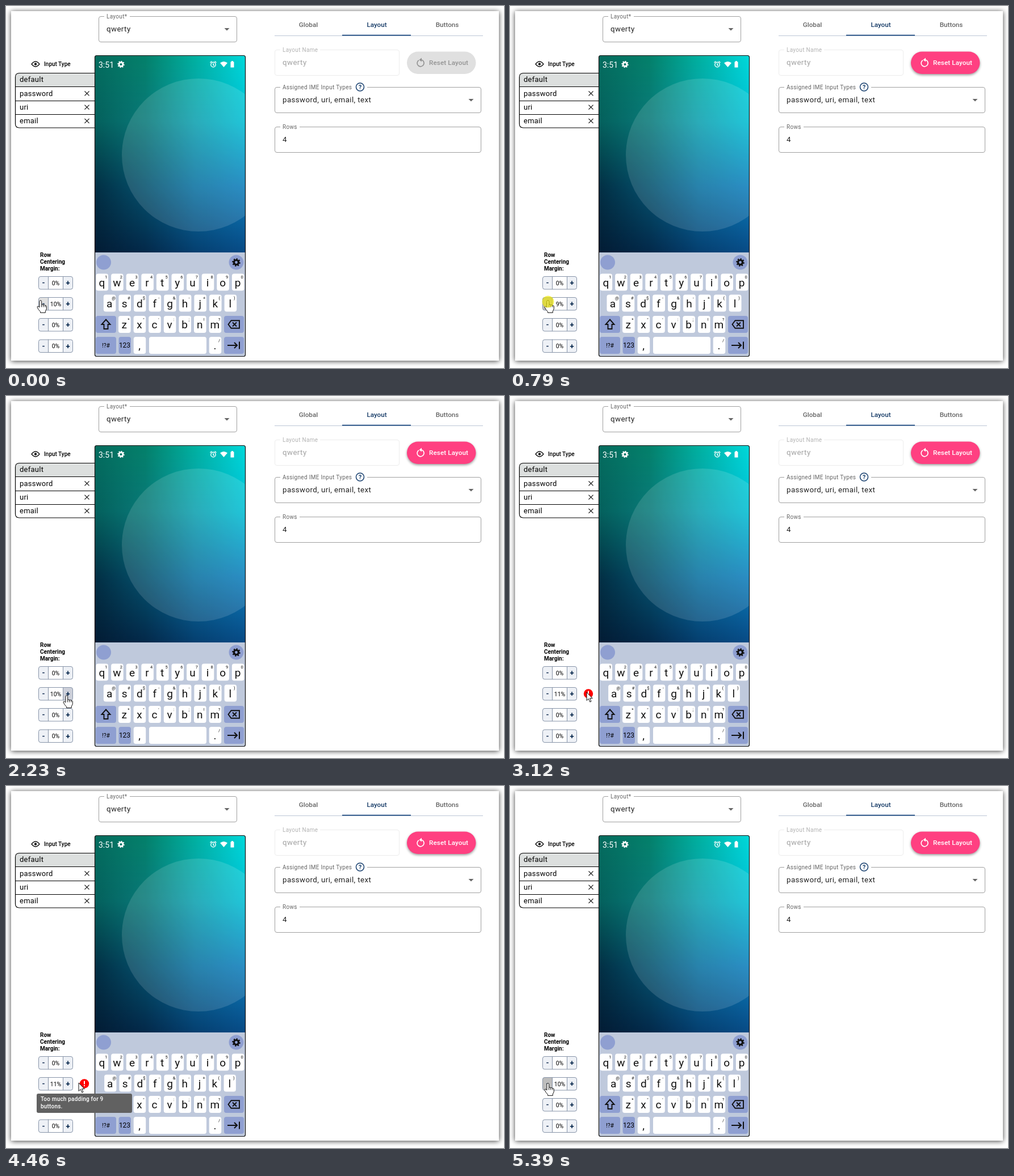
Animation of 877 by 639 pixels, one loop 5460 ms. Source, as an HTML page with a canvas:

```html
<!DOCTYPE html>
<html lang="en">
<head>
<meta charset="utf-8">
<title>Row centering margin</title>
<style>
  html, body { margin: 0; width: 100%; height: 100%; overflow: hidden; background: #fff; }
  #card { position: absolute; left: 9px; top: 9px; width: 859px; height: 617px; background: #fff; box-shadow: 0 1px 9px rgba(0,0,0,.75); }
  #wall { position: absolute; left: 157px; top: 88px; }
  svg { position: absolute; left: 0; top: 0; font-family: Roboto, sans-serif; }
  .body { font-size: 13.3px; letter-spacing: .42px; fill: #222; }
  .label { font-size: 10px; letter-spacing: .31px; fill: #666; }
  .item { font-size: 13px; letter-spacing: .25px; }
  .tab { font-size: 11.7px; font-weight: 500; fill: #666; text-anchor: middle; }
  .small { font-size: 10px; font-weight: 700; }
  .key { font-size: 19px; fill: #111; text-anchor: middle; }
  .sup { font-size: 7.5px; fill: #111; text-anchor: middle; }
  .mid { font-size: 10.5px; text-anchor: middle; }
  .sign { font-size: 13px; font-weight: 700; fill: #0a2a4f; text-anchor: middle; }
  .tip { font-size: 10px; font-weight: 500; letter-spacing: .2px; fill: #fff; }
</style>
</head>
<body>
<div id="card"></div>
<canvas id="wall" width="264" height="347"></canvas>
<svg id="stage" width="877" height="639"></svg>
<script>
const LOOP = 5460;
const BLUE = '#8f9fd1';

// Each list holds [start time, value]; the last one reached applies.
const margins = [[0, 10], [540, 9], [930, 8], [1690, 9], [1970, 10], [2440, 11], [5200, 10]];
const clicks = [[470, 610], [780, 930], [1620, 1760], [1900, 2030], [2370, 2510], [5130, 5270]];
const path = [
  [0, 61, 520], [59, 61, 520], [60, 59, 520], [260, 59, 520], [470, 67, 520], [930, 67, 520],
  [1350, 106, 528], [1420, 107, 529], [2710, 107, 529], [3120, 135, 523],
  [4459, 135, 523], [4460, 128, 524], [4530, 126, 524], [4990, 67, 525], [LOOP, 67, 525]
];

const at = (list, t) => list.filter(([start]) => start <= t).pop()[1];
const mix = (a, b, k) => a + (b - a) * k;

function along(points, t) {
  const i = Math.max(1, points.findIndex(p => p[0] >= t));
  const [t0, x0, y0] = points[i - 1], [t1, x1, y1] = points[i];
  const k = (t - t0) / (t1 - t0);
  return [mix(x0, x1, k), mix(y0, y1, k)];
}

const text = (x, y, cls, s, extra = '') =>
  `<text x="${x}" y="${y}" class="${cls}" ${extra}>${s.replace(/&/g, '&amp;')}</text>`;
const rect = (x, y, w, h, r, fill, extra = '') =>
  `<rect x="${x}" y="${y}" width="${w}" height="${h}" rx="${r}" fill="${fill}" ${extra}/>`;
const line = (d, color, width = 1, extra = '') =>
  `<path d="${d}" fill="none" stroke="${color}" stroke-width="${width}" ${extra}/>`;
const disc = (x, y, r, fill, extra = '') =>
  `<circle cx="${x}" cy="${y}" r="${r}" fill="${fill}" ${extra}/>`;
const caret = (x, y) => `<path d="M${x - 4.5} ${y - 2}h9l-4.5 4.5z" fill="#666"/>`;

function gear(x, y, size, color) {
  return `<g transform="translate(${x} ${y}) scale(${size / 14})" fill="none" stroke="${color}">
    <circle r="4" stroke-width="3.2"/><circle r="6" stroke-width="2.6" pathLength="16" stroke-dasharray="1 1"/></g>`;
}

function field(x, y, w, label, notch, value, off = false) {
  return rect(x + .5, y + .5, w - 1, 45, 3.5, 'none', `stroke="${off ? '#ececec' : '#a0a0a0'}"`) +
    rect(x + 10, y - 1, notch, 4, 0, '#fff') +
    text(x + 14, y + 3.5, 'label', label, off ? 'style="fill:#b4b4b4"' : '') +
    text(x + 14, y + 27, 'body', value, off ? 'style="fill:#a2a2a2"' : '');
}

function resetButton(on) {
  const ink = on ? '#fff' : '#939393';
  const shadow = on ? 'style="filter:drop-shadow(0 2px 2px rgba(0,0,0,.4))"' : '';
  return rect(706, 80.5, 121.5, 39.5, 19.7, on ? '#ff4081' : '#e0e0e0', shadow) +
    line('M727 95.7A6 6 0 1 0 731.5 95', ink, 1.7) +
    `<path d="M732 91.5v7l-4.5-3.5z" fill="${ink}"/>` +
    text(745, 104.3, 'tab', 'Reset Layout', `style="fill:${ink};text-anchor:start;letter-spacing:.1px"`);
}

function letterKey(cx, top, w, ch, sup = '') {
  return rect(cx - w / 2, top, w, 30, 4, '#fff') + text(cx - .5, top + 22, 'key', ch) +
    text(cx + 7, top + 8.5, 'sup', sup);
}

function letterRow(left, pitch, top, letters, sups) {
  return [...letters].map((ch, i) =>
    letterKey(left + pitch * (i + .5), top, pitch - 5, ch, sups[i])).join('');
}

// The margin shrinks the nine keys and centres them.
const centeredRow = m =>
  letterRow(156 + 266 * m / 200, 266 * (1 - m / 100) / 9, 509.5, 'asdfghjkl', '@#$-&-+()');

function stepper(y, value, minus = '#eef1f6', plus = '#eef1f6') {
  return rect(57.5, y + .5, 60, 22.5, 3.5, '#fff') +
    `<path d="M74.5 ${y + .5}h-14q-3 0-3 3v16.5q0 3 3 3h14z" fill="${minus}"/>` +
    `<path d="M100.5 ${y + .5}h14q3 0 3 3v16.5q0 3-3 3h-14z" fill="${plus}"/>` +
    rect(57.5, y + .5, 60, 22.5, 3.5, 'none', 'stroke="#8794a8"') +
    line(`M74.5 ${y}v23M100.5 ${y}v23`, '#8794a8') +
    text(66, y + 16, 'sign', '-') + text(109, y + 16, 'sign', '+') +
    text(87.5, y + 15.5, 'mid', value + '%');
}

function inputTypes() {
  const names = ['default', 'password', 'uri', 'email'];
  const shape = 'M156 118.5H23.5q-7 0-7 7v82.5q0 7 7 7H156';
  return line('M45 102.5q7-9 14 0q-7 9-14 0z', '#111', 1.3) + disc(52, 102.5, 2.2, '#111') +
    text(67, 106, 'small', 'Input Type', 'style="font-weight:500"') +
    `<path d="M156 118.5H23.5q-7 0-7 7V142H156z" fill="#dcdfde"/>` + line(shape, '#000', 1.2) +
    names.map((name, i) => {
      const y = 118 + 24.3 * i;
      const extras = i ? line(`M16.5 ${Math.round(y) + .5}H156`, '#000') +
        line(`M138.5 ${y + 8}l8 8m0-8l-8 8`, '#111', 1.2) : '';
      return text(24, y + 16.3, 'item', name) + extras;
    }).join('');
}

function phone() {
  return `<clipPath id="screen"><rect x="157" y="88" width="264" height="347"/></clipPath>` +
    disc(339, 263, 135, '#fff', 'opacity=".13" clip-path="url(#screen)"') +
    text(163, 109, '', '3:51', 'fill="#fff" font-size="14"') + gear(202.5, 103, 12, '#fff') +
    `<g stroke="#fff" fill="none" stroke-width="1.4"><circle cx="365" cy="103.5" r="4.2"/>
     <path d="M365 101v3l2 1M359.5 100l3-2.5M370.5 100l-3-2.5"/></g>
     <path d="M377 100.5q6.5-5 13 0l-6.5 7.5zM395.5 98.5h1.5v-1.5h3v1.5h1.5v10h-6z" fill="#fff"/>` +
    rect(157, 435, 264, 183, 0, '#bfc9dc') +
    disc(172, 452.5, 13, BLUE) + disc(405.5, 452.5, 13, BLUE) + gear(405.5, 452.5, 14, '#111') +
    letterRow(156, 26.6, 472.5, 'qwertyuiop', '1234567890') +
    letterRow(195.5, 26.6, 547, 'zxcvbnm', `*"':;!?`) +
    [[158, 547, 36], [384, 547, 35], [158, 584, 36], [198.5, 584, 21.5], [384, 584, 35]]
      .map(([x, y, w]) => rect(x, y, w, 30, 4, BLUE)).join('') +
    line('M176 553.5l7.5 8.5h-4v8h-7v-8h-4z', '#111', 1.9) +
    line('M391.5 562l5-6.8h14.5v13.6h-14.5zM399 558.5l7 7m0-7l-7 7', '#111', 1.9) +
    line('M390 599h17m-5-5l5 5l-5 5M411 592.5v13', '#111', 2) +
    text(176, 602.5, 'mid', '!?#') + text(209, 603, 'mid', '123', 'style="font-size:12px"') +
    letterKey(235.5, 584, 21.5, ',') + rect(252, 584, 101, 30, 4, '#fff') +
    letterKey(368.5, 584, 21.5, '.', '/') +
    '<g id="row"></g>' + rect(156.5, 87.5, 265, 531, 3, 'none', 'stroke="#111" stroke-width="1.2"');
}

function settings() {
  return text(532.5, 36.5, 'tab', 'Global') +
    text(653, 36.5, 'tab', 'Layout', 'style="fill:#153a66"') + text(777, 36.5, 'tab', 'Buttons') +
    line('M473 52.5h367', '#bcc6d6') + line('M592 51.7h121', '#1d4a80', 1.7) +
    field(163, 18, 244, 'Layout*', 45, 'qwerty') + caret(389, 41) +
    field(473, 77, 220, 'Layout Name', 70, 'qwerty', true) +
    field(473, 143, 364, 'Assigned IME Input Types', 153, 'password, uri, email, text') + caret(819, 166) +
    disc(623.5, 143, 7, '#fff', 'stroke="#173f6e" stroke-width="1.5"') +
    text(623.5, 147, 'mid', '?', 'style="fill:#173f6e;font-weight:700"') +
    field(473, 213, 364, 'Rows', 34, '4');
}

const stage = document.getElementById('stage');
stage.innerHTML = settings() + inputTypes() + phone() +
  ['Row', 'Centering', 'Margin:'].map((s, i) => text(60, 443 + 12 * i, 'small', s)).join('') +
  stepper(477, 0) + stepper(551, 0) + stepper(588.5, 0) +
  '<g id="reset"></g><g id="stepper"></g>' +
  `<g id="error">${disc(138, 525.5, 8.2, '#f00')}${rect(137, 520.5, 2, 6, .5, '#fff')}${rect(137, 528, 2, 2, .5, '#fff')}</g>` +
  `<g id="tooltip">${rect(54, 543, 168, 34, 3, '#616161')}
    ${text(61, 556, 'tip', 'Too much padding for 9')}${text(61, 569, 'tip', 'buttons.')}</g>` +
  `<g id="cursor" stroke="#111" fill="#fff">
    <path id="hand" d="M-2 12V1.5a1.8 1.8 0 0 1 3.6 0V7.5l1.2-.6 2 .8 1.5-.2 1.6 1 1.4.2 1 1.2v5l-2 4v2.5H-.5V19.500L-4 15.500-6 11.500q0-2 2-1.200zM1.600 7.500v4M4.800 8v3.500M7.900 9v2.500"/>
    <path id="arrow" d="M0 0v14.500l3.300-3 2.500 5.600 2.200-1-2.400-5.400h4.600z"/></g>` +
  disc(0, 2, 10.5, '#f0e800', 'id="flash" opacity=".65"');

function paintWall() {
  const ctx = document.getElementById('wall').getContext('2d');
  const rows = [
    ['046c5e', '04806a', '00b0a0', '00d8da'],
    ['04605c', '087878', '0a9fae', '00bcd2'],
    ['022f44', '04506c', '0870a0', '0a7cba'],
    ['021c34', '03294a', '053f70', '084b86']
  ].map(row => row.map(c => [0, 2, 4].map(i => parseInt(c.slice(i, i + 2), 16))));
  for (let y = 0; y < 347; y++) {
    const v = y / 346 * 3, i = Math.min(2, Math.floor(v));
    const fill = ctx.createLinearGradient(0, 0, 264, 0);
    rows[i].forEach((c, j) =>
      fill.addColorStop(j / 3, `rgb(${c.map((a, k) => Math.round(mix(a, rows[i + 1][j][k], v - i)))})`));
    ctx.fillStyle = fill;
    ctx.fillRect(0, y, 264, 1);
  }
}

const el = Object.fromEntries(['row', 'reset', 'stepper', 'error', 'tooltip', 'cursor', 'hand', 'arrow', 'flash']
  .map(id => [id, document.getElementById(id)]));
const show = (node, on) => node.setAttribute('visibility', on ? 'visible' : 'hidden');
const cache = {};
function fill(id, html) {
  if (cache[id] !== html) el[id].innerHTML = cache[id] = html;
}

function draw(t) {
  const m = at(margins, t), [x, y] = along(path, t);
  const onMinus = x < 74, onPlus = x > 99 && x < 117;
  const minus = !onMinus ? undefined : t >= 5130 || (t >= 470 && t < 1000) ? '#bdbdbd' : '#e0e0e0';
  const plus = !onPlus ? undefined : t >= 1620 && t < 3000 ? '#cdd0da' : '#e0e0e0';
  fill('row', centeredRow(m));
  fill('reset', resetButton(t >= 540));
  fill('stepper', stepper(514, m, minus, plus));
  show(el.error, m > 10);
  const tip = t < 3870 ? 0 : t < 4000 ? .4 + (t - 3870) / 220 : t < 4530 ? 1 : Math.max(0, 1 - (t - 4530) / 130);
  el.tooltip.setAttribute('opacity', tip);
  const place = `translate(${Math.round(x)} ${Math.round(y)})`;
  el.cursor.setAttribute('transform', place);
  el.flash.setAttribute('transform', place);
  show(el.hand, onMinus || onPlus);
  show(el.arrow, !onMinus && !onPlus);
  show(el.flash, clicks.some(([a, b]) => t >= a && t < b));
}

paintWall();
draw(0);
const begin = performance.now();
(function tick() {
  draw((performance.now() - begin) % LOOP);
  requestAnimationFrame(tick);
})();
</script>
</body>
</html>
```
